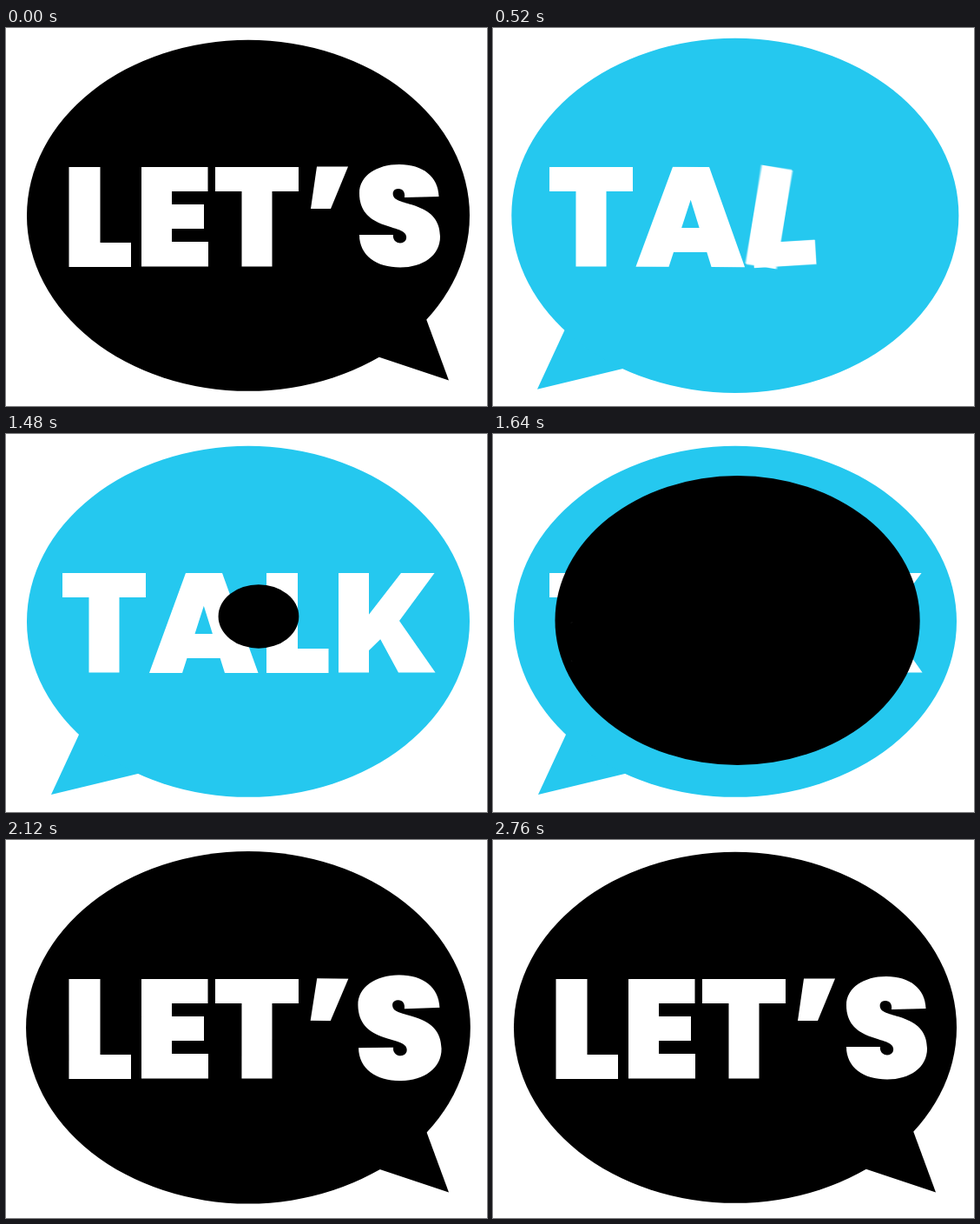
These frames come from a looping animation (554 px wide and 435 px high, 2.84 s). An HTML page with a canvas:

```html
<!DOCTYPE html>
<html lang="en">
<head>
<meta charset="utf-8">
<title>Let's talk</title>
<style>
html, body { margin: 0; width: 100%; height: 100%; overflow: hidden; background: #fff; }
canvas { display: block; }
</style>
</head>
<body>
<canvas id="stage" width="554" height="435" role="img" aria-label="LET'S TALK"></canvas>
<script>
const W = 554, H = 435;
const ctx = document.getElementById('stage').getContext('2d');
const layer = document.createElement('canvas');
layer.width = W;
layer.height = H;
const ink = layer.getContext('2d');

const LOOP = 2840, HALF = LOOP / 2, STEP = 40;
const CX = 279, CY = 215.8, RX = 255, RY = 202;
const OX = 293.6, OY = 208.6; // point the bubbles grow from
const SAMPLES = 8, SHUTTER = 16; // motion blur

// A stroke of a letter: shape, pivot and swing direction
const part = (d, x, y, dir) => ({ path: new Path2D(d), x, y, dir });
const bar = (x, y, w, h, px, py, dir) => part(`M${x} ${y}h${w}v${h}h${-w}z`, px, py, dir);

const letterL = x => [
  bar(x, 160, 36, 115, x + 18, 217, -1.6),
  bar(x, 247, 71.5, 28, x + 18, 261, 0.6)
];
const letterT = x => [
  bar(x, 160, 96, 28, x + 48, 174, 0.4),
  bar(x + 30.5, 160, 35, 114.5, x + 48, 164, -0.4)
];
const letterE = [
  bar(156, 160, 35, 114.5, 174, 217, 0.7),
  bar(171, 160, 61.5, 28, 174, 174, 0.7),
  bar(171, 203, 57, 28, 174, 217, -0.4),
  bar(171, 246, 62, 28.5, 174, 260, -0.8)
];
const letterA = [
  part('M207 160H240L203 275H165z', 235, 163, 0.9),
  part('M216 160H249L290.5 275H252z', 235, 163, 0.75),
  bar(206, 230, 43, 28, 227, 244, 0.75)
];
const letterK = [
  bar(383, 160, 35, 114.5, 400, 217, -1),
  part('M455 160H493.5L453 215L417 250V209z', 418, 210, 1),
  part('M417 210L440 195L453 215L494.5 274.5H452z', 418, 210, -1)
];
const apostrophe = [part('M358 159.5H394L374 208H351z', 372, 184, 1)];
const letterS = [part(
  'M498.5 194L459 195C460 189 457 185 452 185C446 185 444 190 447 195' +
  'C455 205 500 201 500 240C500 262 480 275.5 454 275.5C427 275.5 407 262 407 238H446' +
  'C445 243 449 247.5 454 247.5C460 247.5 463 242 460 237C453 226 407 231 407 190' +
  'C407 170 427 157 453 157C480 157 498 171 498.5 194z', 453, 216, 0.4)];

const talk = {
  color: '#25c8ef', lead: 17,
  letters: [letterT(65), letterA, letterL(300), letterK], textAt: 116, stagger: 140,
  tail: new Path2D('M52 415L103 305L210 377z'), out: [-0.78, 0.63], tailAt: 200,
  tailOut: h => h < 280 ? -60 + 87 * easeOut((h - 200) / 80) : 27 * Math.exp((280 - h) / 80)
};
const lets = {
  color: '#000', lead: 0,
  letters: [letterL(72.5), letterE, letterT(241), apostrophe, letterS], textAt: 224, stagger: 80,
  tail: new Path2D('M510 405.5L470 297L384 363.5z'), out: [0.74, 0.67], tailAt: 280,
  tailOut: h => -60 * (1 - easeOut((h - 280) / 100))
};

const clamp = u => Math.max(0, Math.min(1, u));
const easeOut = u => 1 - (1 - clamp(u)) ** 2;

function backIn(u) {
  u = clamp(u);
  return u * u * (2.7 * u - 1.7);
}

function bodyScale(h) {
  if (h > 300) return 1 + 0.045 * Math.exp((300 - h) / 157);
  return 1.045 * (1 - (1 - clamp((h - 20) / 280)) ** 1.24);
}

function drawTail(b, shift, s) {
  ctx.save();
  ctx.translate(OX, OY);
  ctx.scale(Math.min(s, 1), Math.min(s, 1));
  ctx.translate(b.out[0] * shift - OX, b.out[1] * shift - OY);
  ctx.fill(b.tail);
  ctx.restore();
}

function letterPath(parts, age) {
  const path = new Path2D();
  if (age <= 0) return path;
  let size = 1 - Math.exp(-((age / 45) ** 1.5));
  if (age > 100 && age < 240) size += 0.03 * Math.sin(Math.PI * (age - 100) / 140);
  const turn = 70 * Math.exp(-age / 50) * Math.cos(Math.PI * age / 120);
  for (const p of parts) {
    const m = new DOMMatrix().translate(p.x, p.y).rotate(turn * p.dir).scale(size).translate(-p.x, -p.y);
    path.addPath(p.path, m);
  }
  return path;
}

function drawText(b, h) {
  ink.clearRect(0, 0, W, H);
  ink.fillStyle = '#fff';
  ink.globalAlpha = 1 / SAMPLES;
  ink.globalCompositeOperation = 'lighter';
  b.letters.forEach((parts, i) => {
    const age = h - b.textAt - i * b.stagger;
    for (let k = 0; k < SAMPLES; k++) {
      ink.fill(letterPath(parts, age + SHUTTER * ((k + 0.5) / SAMPLES - 0.5)));
    }
  });
  ctx.drawImage(layer, 0, 0);
}

function drawBubble(b, h, tailShift) {
  const s = bodyScale(h + b.lead);
  if (s <= 0) return;
  ctx.save();
  ctx.fillStyle = b.color;
  if (tailShift !== null) drawTail(b, tailShift, s);
  const body = new Path2D();
  body.ellipse(OX + (CX - OX) * s, OY + (CY - OY) * s, RX * s, RY * s, 0, 0, 2 * Math.PI);
  ctx.fill(body);
  ctx.clip(body);
  drawText(b, h);
  ctx.restore();
}

function draw(t) {
  const h = t % HALF;
  const [next, prev] = t < HALF ? [talk, lets] : [lets, talk];
  ctx.fillStyle = '#fff';
  ctx.fillRect(0, 0, W, H);
  if (h < 320) drawBubble(prev, h + HALF, -60 * backIn((h - 69) / 240));
  drawBubble(next, h, h >= next.tailAt ? next.tailOut(h) : null);
}

const start = performance.now();
function tick() {
  const t = (performance.now() - start) % LOOP;
  draw(Math.min(Math.floor(t / STEP) * STEP, LOOP - 2 * STEP));
  requestAnimationFrame(tick);
}
tick();
</script>
</body>
</html>
```
